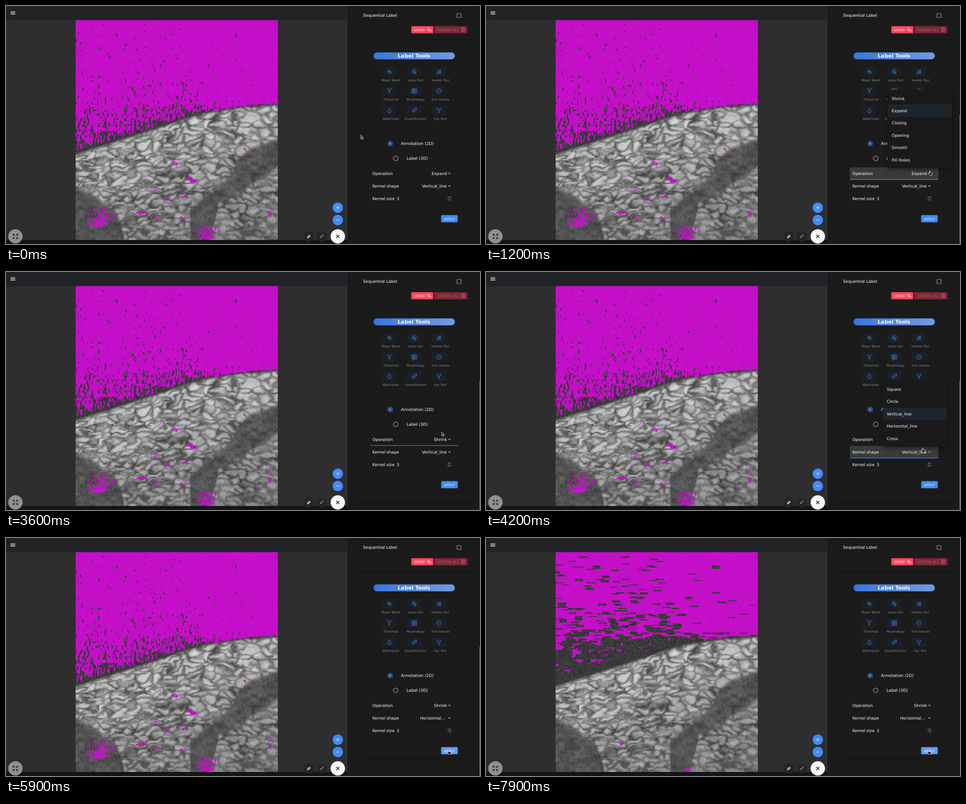
An HTML page with a canvas that plays this animation: 1055x531 px, repeating every 8000 ms.

```html
<!DOCTYPE html>
<html lang="en">
<head>
<meta charset="utf-8">
<title>Label tools</title>
<style>
  html, body { margin: 0; width: 100%; height: 100%; overflow: hidden; background: #1a1a1a; }
  #viewer { position: absolute; left: 0; top: 0; width: 760px; height: 531px; background: #2e2e2e; }
  canvas { position: absolute; left: 155px; top: 31px; width: 450px; height: 491px; }
  .mask { image-rendering: pixelated; }
  svg { position: absolute; left: 0; top: 0; }
  text { font: 9.14px "DejaVu Sans", sans-serif; fill: #fff; text-rendering: geometricPrecision; white-space: pre; }
  .small { font-size: 6.8px; fill: #8c8c8c; text-anchor: middle; }
  .button { font-size: 7.43px; letter-spacing: .45px; }
  .title { font-size: 11.43px; font-weight: bold; letter-spacing: .09px; text-anchor: middle; }
  .end { text-anchor: end; }
  .line { fill: none; stroke: #448aff; stroke-width: 1; stroke-linejoin: round; stroke-linecap: round; }
  .card { fill: #1b1b1b; filter: drop-shadow(0 1px 1.5px #0005); }
  .menu { fill: #1a1a1a; filter: drop-shadow(0 3px 4px #0007); }
</style>
</head>
<body>
<div id="viewer"></div>
<canvas id="tissue"></canvas>
<canvas id="before" class="mask"></canvas>
<canvas id="after" class="mask"></canvas>
<svg id="ui" width="1055" height="531" viewBox="0 0 1055 531"></svg>
<script>
const $ = id => document.getElementById(id);
const clamp = (v, lo = 0, hi = 1) => Math.min(hi, Math.max(lo, v));
const ramp = (v, a, b) => clamp((v - a) / (b - a));
const smooth = (v, a, b) => { const k = ramp(v, a, b); return k * k * (3 - 2 * k); };
const mix = (a, b, k) => a + (b - a) * k;

// ---------- Tissue scan and its label mask ----------
const COLS = 180, ROWS = 196, CELL = 2.5;

function hash(x, y) {
  let h = Math.imul(x | 0, 374761393) + Math.imul(y | 0, 668265263);
  h = Math.imul(h ^ (h >>> 13), 1274126177);
  return ((h ^ (h >>> 16)) >>> 0) / 4294967296;
}
function noise(x, y) {
  const ix = Math.floor(x), iy = Math.floor(y);
  const u = smooth(x - ix, 0, 1), v = smooth(y - iy, 0, 1);
  return mix(mix(hash(ix, iy), hash(ix + 1, iy), u), mix(hash(ix, iy + 1), hash(ix + 1, iy + 1), u), v);
}
function curve(points, x) {
  let i = 1;
  while (i < points.length - 1 && points[i][0] < x) i++;
  const [a, b] = [points[i - 1], points[i]];
  return mix(a[1], b[1], ramp(x, a[0], b[0]));
}
// Gap between the two nearest cell centres: small along the cracks.
function crackGap(x, y) {
  const ix = Math.floor(x), iy = Math.floor(y);
  let near = 9, next = 9;
  for (let j = iy - 1; j <= iy + 1; j++) for (let i = ix - 1; i <= ix + 1; i++) {
    const d = Math.hypot(i + hash(i, j + 500) - x, j + hash(i + 500, j) - y);
    if (d < near) { next = near; near = d; } else if (d < next) next = d;
  }
  return next - near;
}

const EDGE = [[155, 331], [200, 317], [255, 300], [330, 275], [400, 250], [440, 240], [480, 234], [520, 227], [605, 221]];
const BAND_TOP = [[410, 450], [440, 425], [475, 402], [505, 365], [520, 335], [545, 315], [605, 293]];
const BAND_BOTTOM = [[410, 540], [450, 530], [468, 470], [475, 438], [530, 410], [570, 385], [605, 360]];
const CORNER = [[155, 402], [185, 408], [215, 435], [240, 445], [256, 480], [268, 540]];
// x, y, radius x, radius y, density
const SPOTS = [
  [409, 384, 8, 5, 1.5], [417, 390, 8, 5, 1.5], [302, 460, 12, 4, 1.6], [212, 468, 34, 20, .55],
  [205, 482, 26, 12, .8], [445, 506, 27, 20, .6], [448, 516, 17, 4, 2.5], [375, 351, 9, 5, .8],
  [320, 342, 5, 4, .8], [335, 412, 14, 4, .5], [357, 428, 8, 6, .9], [340, 470, 18, 6, .5],
  [395, 424, 12, 5, .5], [530, 321, 12, 6, .5], [590, 312, 16, 12, .15], [590, 460, 8, 30, .2],
  [395, 472, 12, 5, .6]
];

const cellX = i => 155 + CELL * (i + .5);
const cellY = j => 31 + CELL * (j + .5);

// Long soft lenses that follow the skin edge and flatten with depth.
function lenses(x, y) {
  const wx = x + 22 * (noise(x / 20, y / 14) - .5) + 6 * (noise(x / 6, y / 6 + 90) - .5);
  const wy = y + 14 * (noise(x / 22 + 40, y / 16) - .5) + 4 * (noise(x / 6 + 60, y / 6) - .5);
  const depth = wy - curve(EDGE, wx);
  const gap = crackGap(wx / 29, depth * (1 - .0012 * (wx - 380)) / 12);
  const strength = .45 + .55 * noise(x / 24 + 20, y / 18 + 20);
  const crack = (1 - smooth(gap, -.08, .55)) * strength;
  return mix(202 - depth * .22, 62, crack) + 46 * (noise(wx / 15 + 9, depth / 6) - .5);
}
function grayAt(i, j) {
  const x = cellX(i), y = cellY(j), depth = y - curve(EDGE, x);
  const grain = (hash(i + 900, j) - .5) * 26;
  const band = x > 410 ? smooth(y - curve(BAND_TOP, x), -5, 9) * smooth(curve(BAND_BOTTOM, x) - y, -9, 12) : 0;
  const corner = x < 268 ? smooth(y - curve(CORNER, x), -5, 14) : 0;
  const shade = 80 + 34 * (noise(x / 12, y / 9) - .5);
  const inside = mix(lenses(x, y), shade, Math.max(band, corner) * .92);
  return mix(58, inside, smooth(depth, -5, 5)) + grain;
}

function seeded(i, j) {
  const x = cellX(i), u = (x - 155) / 450, above = Math.max(curve(EDGE, x) - cellY(j), 0);
  const reach = u < .55 ? 42 - 30 * u : mix(25, 2, ramp(u, .55, .72));
  const patchy = 2.2 * noise(i / 4 + 80, j / 4) ** 1.5;
  const sparse = patchy * (.012 + .06 * Math.exp(-above / 90)) * (1 - u) ** 1.3;
  const hole = .001 + sparse + .85 * Math.exp(-above / reach);
  return hash(i + 3000, j + 3000) > Math.cbrt(clamp(hole));
}
function labelled(i, j) {
  const x = cellX(i), y = cellY(j), above = curve(EDGE, x) - y;
  if (above > 2 + 6 * clamp(1 - (x - 155) / 300) + 3 * noise(i / 2, 7)) {
    return [-1, 0, 1].some(k => seeded(i, j + k));
  }
  return above < -20 && SPOTS.some(([sx, sy, rx, ry, p]) =>
    hash(i + 70, j + 70) < p * (1 - ((x - sx) / rx) ** 2 - ((y - sy) / ry) ** 2));
}

function paint(id, pixel) {
  const canvas = $(id);
  canvas.width = COLS;
  canvas.height = ROWS;
  const ctx = canvas.getContext("2d"), image = ctx.createImageData(COLS, ROWS);
  for (let j = 0; j < ROWS; j++) for (let i = 0; i < COLS; i++) {
    image.data.set(pixel(i, j), (j * COLS + i) * 4);
  }
  ctx.putImageData(image, 0, 0);
}
function magenta(i, j) {
  const n = 10 * (noise((i + j * .5) / 2, (j - i * .3) / 6) - .5);
  return [196 + n, 15, 200 + n, 255];
}
const mask = Array.from({ length: ROWS }, (_, j) => Array.from({ length: COLS }, (_, i) => labelled(i, j)));
const shrunk = (i, j) => mask[j].slice(Math.max(0, i - 3), i + 4).every(Boolean);
const CLEAR = [0, 0, 0, 0];

paint("tissue", (i, j) => { const g = grayAt(i, j); return [g, g, g, 255]; });
paint("before", (i, j) => mask[j][i] ? magenta(i, j) : CLEAR);
paint("after", (i, j) => shrunk(i, j) ? magenta(i, j) : CLEAR);

// ---------- Interface ----------
const text = (x, y, s, attrs = "") => `<text x="${x}" y="${y + 3.3}" ${attrs}>${s}</text>`;
const rect = (x, y, w, h, attrs) => `<rect x="${x}" y="${y}" width="${w}" height="${h}" ${attrs}/>`;
const circle = (x, y, r, attrs) => `<circle cx="${x}" cy="${y}" r="${r}" ${attrs}/>`;
const path = (x, y, d, attrs = 'class="line"') => `<path transform="translate(${x} ${y})" d="${d}" ${attrs}/>`;
const stroke = (color, width) => `fill="none" stroke="${color}" stroke-width="${width}"`;

const TOOLS = [
  ["Magic Wand", "M-4-1L0-4L4 1L0 4ZM-4-1L3 0M-3-5L-1-3M5 3V4"],
  ["Lasso Tool", "M-4 3C-6-2-3-5 0-5S6-2 4 1M-3 0Q-2-3 1-2M0-1L4 3L2 3L1 5Z"],
  ["Snakes Tool", "M-4-4L-1-1M1-4L4-4L2-1L5 1L1 1L3 5M-4 0L-1 4M-2 1L0 2M-5 4H-3M0-3L2 0"],
  ["Threshold", "M-5-4A1.5 1.5 0 1 1-2-3L0 0V5M5-4A1.5 1.5 0 1 0 2-3L0 0M-2 1L0 3"],
  ["Morphology", "M-5-5H-1V-1H-5ZM1-5H5V-1H1ZM-5 1H-1V5H-5ZM1 1H5V5H1Z"],
  ["Trim Islands", "M-5 0A5 5 0 1 1 5 0A5 5 0 1 1-5 0M-2 0H2"],
  ["Watershed", "M0-5C2-2 3.5 0 3.5 2A3.5 3.2 0 0 1-3.5 2C-3.5 0-2-2 0-5"],
  ["Quantification", "M-5 1L1-5H5V-1L-1 5ZM-3 3L3-3M-1-1L1 1"],
  ["Fgc Tool", "M-3-3V-1L0 1L3-1V-3M0 1V4M-4-4H-2M2-4H4M-1 5H1"]
];
const tools = TOOLS.map(([name, icon], n) => {
  const x = 853.5 + 55 * (n % 3), y = 147 + 42.8 * Math.floor(n / 3);
  return rect(x - 15.5, y - 10.5, 31, 21, 'rx="4" fill="#1c2026"') + path(x, y, icon) +
    text(x + 3, y + 17.7, name, 'class="small"');
}).join("");

const ITEM = 27.4;
const menu = (id, x, y, items) => {
  const rows = items.map((s, n) => text(x + 9, y + 18.7 + n * ITEM, s)).join("");
  const bar = (part, color) => rect(x, y + 5, 143, ITEM, `id="${id}-${part}" fill="${color}"`);
  return `<g id="${id}">${rect(x, y, 143, items.length * ITEM + 9.5, 'rx="2.5" class="menu"')}` +
    `${bar("hover", "#262626")}${bar("selected", "#1f252d")}` +
    rect(x + 44, y + 5 + 3 * ITEM, 73, ITEM, `id="${id}-ripple" rx="11" fill="#fff"`) + `${rows}</g>`;
};
const field = (id, y) =>
  rect(810, y - 14, 197, 27.5, `id="${id}-hover" fill="#3a3a3a" rx="2"`) +
  rect(810.5, y + 12.5, 196, 1.2, `id="${id}-focus" fill="#448aff"`);
const arrowDown = y => path(987, y, "M-3-1.4H3L0 1.6Z", 'fill="#aaa"');

$("ui").innerHTML = `
  <defs><linearGradient id="pill"><stop stop-color="#3a75dd"/><stop offset="1" stop-color="#6f9ce0"/></linearGradient></defs>
  ${rect(0, 0, 760, 31.5, 'fill="#212327"')}
  ${path(10, 15.4, "M0-2.9H10.5M0 0H10.5M0 2.9H10.5", stroke("#fff", 1.15))}
  ${rect(0, 522, 760, 9, 'fill="#151515"')}
  ${circle(21, 514, 16, 'fill="#8e9094"')}
  ${path(21, 514, "M-5-2V-5H-2M2-5H5V-2M5 2V5H2M-2 5H-5V2M-5-5L-1.5-1.5M5-5L1.5-1.5M5 5L1.5 1.5M-5 5L-1.5 1.5", stroke("#111", 1.2))}
  ${[450, 477.5].map(y => circle(738.5, y, 11.5, 'fill="#448aff"')).join("")}
  ${path(738.5, 450, "M-4 0H4M0-4V4M-4 27.5H4", stroke("#fff", 1.1))}
  ${circle(738.5, 514, 16, 'fill="#fafafa"')}
  ${path(738.5, 514, "M-3.5-3.5L3.5 3.5M3.5-3.5L-3.5 3.5", stroke("#111", 1.5))}
  ${[674.5, 702.5].map(x => circle(x, 514, 11.5, 'fill="#252525"')).join("")}
  ${path(674, 514, "M-4.5 2L1-4L4.5-1L-1 4.5H-3Z", 'fill="#aaa"')}
  ${path(702.5, 514, "M-4 4L-3 1.5L3.5-4.5L4.5-3.5L-1.5 3Z", 'fill="#999"')}

  ${rect(776, -10, 264, 84, 'rx="3" class="card"')}
  ${rect(776, 83, 264, 430, 'rx="3" class="card"')}
  ${rect(801, 272, 215, 220, 'rx="3" class="card"')}
  ${text(794.5, 21, "Sequential Label")}
  ${rect(1003.7, 16.7, 9, 9, 'rx="1" ' + stroke("#aaa", 1.1))}
  ${rect(902, 45, 49, 16, 'rx="2" fill="#ff465f"')}
  ${text(908, 52.5, "UNDO", 'class="button"')}
  ${path(941.5, 53, "M-1-4L-4.5-.7L-1 2.5V.7Q3 .3 4.3 3.5Q4-1.5-1-2Z", stroke("#fff", .9))}
  ${rect(953, 45, 74, 16, 'rx="2" fill="#7d2835"')}
  ${text(960, 52.5, "DELETE ALL", 'class="button" style="fill:#ad6c75"')}
  ${path(1017.5, 53, "M-4-3H4M-1.5-3V-4.3H1.5V-3M-3-2.8V4H3V-2.8M-1-1V2.5M1-1V2.5", stroke("#ad6c75", 1))}

  ${rect(818, 103.5, 181, 15.5, 'rx="7.75" fill="url(#pill)"')}
  ${text(908, 112, "Label Tools", 'class="title"')}
  ${tools}
  ${circle(855, 307, 5.2, stroke("#448aff", 1.2))}${circle(855, 307, 2.9, 'fill="#448aff"')}
  ${text(879, 307, "Annotation (2D)")}
  ${circle(867.5, 340, 5.2, stroke("#a8a8a8", 1.2))}
  ${text(891.5, 340, "Label (3D)")}
  ${field("operation", 374)}${field("shape", 402)}
  ${text(815.5, 373.8, "Operation")}${text(981.5, 373.8, "", 'id="operation-value" class="end"')}${arrowDown(374)}
  ${text(815.5, 401.7, "Kernel shape")}${text(922, 401.7, "", 'id="shape-value"')}${arrowDown(402)}
  ${text(815.5, 429.5, "Kernel size")}${text(869.5, 429.5, "3")}
  ${rect(981.5, 424, 11, 11, 'rx="2" fill="#2a2a32"')}
  ${path(987, 429.5, "M-2-1.5L0-3.5L2-1.5M-2 1.5L0 3.5L2 1.5", stroke("#aaa", .9))}
  ${rect(968.5, 466.5, 37, 16, 'rx="2" id="apply"')}
  ${text(975, 474.2, "APPLY", 'class="button"')}
  ${menu("operations", 894, 187.5, ["Shrink", "Expand", "Closing", "Opening", "Smooth", "Fill Holes"])}
  ${menu("shapes", 883, 243, ["Square", "Circle", "Vertical_line", "Horizontal_line", "Cross"])}
  ${rect(1054, 243, 1, 288, 'id="scroll" fill="#8a8a8a"')}
  <g id="pointer" fill="#222" stroke="#fff" stroke-width=".8" stroke-linejoin="round">
    <path id="arrow" d="M.8.8V9.3L2.8 7.6L4.2 10.6L5.6 10L4.3 7.1L6.9 7Z"/>
    <path id="hand" d="M3 6.8V1.3Q3.7 0 4.5 1.3V4.2L8.8 5.2Q9.6 5.6 9.3 7L8.5 10.5H4L.7 7.2Q.6 5.8 2 6.2Z"/>
  </g>`;

// ---------- Timeline ----------
const LOOP = 8000, STEP = 100;
const PATH = [
  [0, 789, 287], [600, 984, 367], [1200, 984, 367], [1800, 965, 285], [2300, 965, 285], [2400, 953, 250],
  [3100, 953, 250], [3200, 955, 205], [3300, 970, 320], [3500, 970, 320], [3700, 968, 392], [4200, 968, 392],
  [4700, 963, 345], [5200, 963, 345], [5600, 981, 472], [LOOP, 981, 472]
];
const during = (t, ...spans) => spans.some(([a, b]) => t >= a && t < b);
const show = (id, opacity) => $(id).style.opacity = +opacity;
const place = (id, row) => $(id).setAttribute("transform", `translate(0 ${row * ITEM})`);

function render(t) {
  const n = PATH.findIndex(p => p[0] > t), [a, b] = [PATH[n - 1], PATH[n]];
  const k = smooth(t, a[0], b[0]);
  $("pointer").setAttribute("transform", `translate(${mix(a[1], b[1], k)} ${mix(a[2], b[2], k)})`);
  const hand = during(t, [600, 1300], [2200, 3300], [3700, 4400], [5600, LOOP]);
  show("hand", hand);
  show("arrow", !hand);

  show("operation-hover", ramp(t, 500, 800) * (1 - ramp(t, 1200, 1500)));
  show("operation-focus", during(t, [800, 4000]));
  $("operation-value").textContent = t < 3200 ? "Expand" : "Shrink";
  show("operations", ramp(t, 900, 1200) * (1 - ramp(t, 3100, 3300)));
  show("operations-hover", during(t, [1600, 3400]));
  show("operations-ripple", 0);
  place("operations-hover", t < 3200 ? 2 : 0);
  place("operations-selected", t < 3200 ? 1 : 0);

  show("shape-hover", ramp(t, 3800, 4100) * (1 - ramp(t, 4300, 4600)));
  show("shape-focus", during(t, [4000, 5500]));
  const horizontal = t >= 4800;
  $("shape-value").textContent = horizontal ? "Horizontal…" : "Vertical_line";
  $("shape-value").setAttribute("x", horizontal ? 922 : 925.7);
  show("shapes", ramp(t, 4000, 4200) * (1 - ramp(t, 5000, 5500)));
  show("shapes-hover", during(t, [4600, 5500]));
  show("shapes-ripple", horizontal ? .06 : 0);
  place("shapes-hover", 3);
  place("shapes-selected", horizontal ? 3 : 2);

  $("apply").setAttribute("fill", t < 5600 ? "#448aff" : "#5f9cff");
  show("scroll", during(t, [200, 1800], [3300, 4800], [5400, 7000]) ? 1 : during(t, [1800, 2000], [7000, 7300]) ? .5 : 0);
  show("before", t < 7800);
  show("after", t >= 7800);
}

const start = performance.now();
function tick() {
  const t = (performance.now() - start) % LOOP;
  render(Math.floor(t / STEP) * STEP);
  requestAnimationFrame(tick);
}
tick();
</script>
</body>
</html>
```
